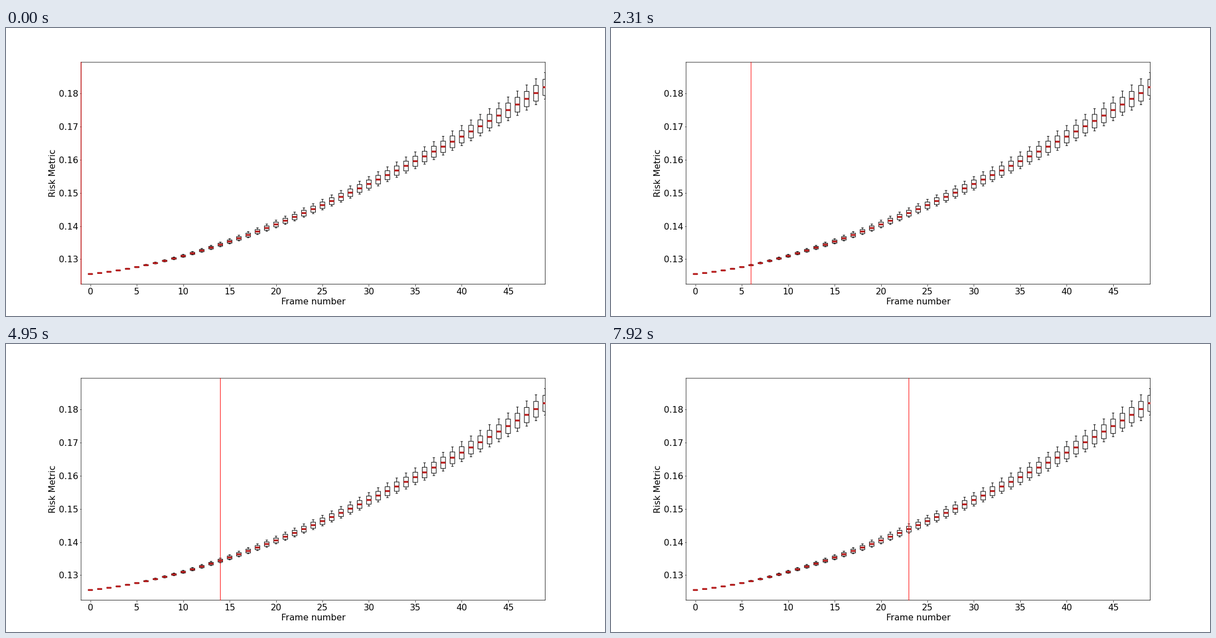
A matplotlib script that plays this animation: 1077x520 px, repeating every 8000 ms.

```python
import numpy as np
import matplotlib.pyplot as plt
from matplotlib.animation import FuncAnimation
from matplotlib.collections import LineCollection

WIDTH, HEIGHT, DPI = 1077, 520, 72
LEFT, RIGHT, TOP, BOTTOM = 135, 969.6, 61.9, 462.6
LOOP_MS, TICK_MS, STEP_MS = 8000, 20, 330
HALF_BOX, HALF_CAP = 0.25, 0.125

plt.rcParams.update({
    "font.family": "DejaVu Sans", "font.size": 15.75, "axes.labelpad": 3,
    "xtick.major.size": 2.5, "ytick.major.size": 2.5,
    "xtick.major.pad": 4.3, "ytick.major.pad": 2.5,
})

# The median is a smooth curve through a few points.
KEY_X = [0, 5, 10, 20, 30, 40, 49]
KEY_Y = [0.12555, 0.12757, 0.1310, 0.14053, 0.15266, 0.16704, 0.18192]
xs = np.arange(50)
median = np.polyval(np.polyfit(KEY_X, KEY_Y, 4), xs)

# Every box grows by the same power law.
growth = (xs / 49) ** 1.38
q1, q3 = median - 0.0025 * growth, median + 0.00237 * growth
low, high = median - 0.0036 * growth, median + 0.00443 * growth


def level(y, half):
    """Horizontal strokes of a given half width, centred on each x."""
    return [[(x - half, v), (x + half, v)] for x, v in zip(xs, y)]


def upright(y0, y1):
    return [[(x, a), (x, b)] for x, a, b in zip(xs, y0, y1)]


def outline(x, lo, hi):
    a, b = x - HALF_BOX, x + HALF_BOX
    return [(a, lo), (b, lo), (b, hi), (a, hi), (a, lo)]


def add_strokes(segments, **style):
    ax.add_collection(LineCollection(segments, snap=False, **style), autolim=False)


fig = plt.figure(figsize=(WIDTH / DPI, HEIGHT / DPI), dpi=DPI)
ax = fig.add_axes([LEFT / WIDTH, 1 - BOTTOM / HEIGHT,
                   (RIGHT - LEFT) / WIDTH, (BOTTOM - TOP) / HEIGHT])
ax.set_xlim(-1, 49)
ax.set_ylim(0.12245, 0.18945)
ax.set_xticks(range(0, 50, 5))
ax.set_yticks(np.arange(0.13, 0.185, 0.01))
ax.yaxis.set_major_formatter("{x:.2f}")
ax.set_xlabel("Frame number")
ax.set_ylabel("Risk Metric")
for spine in ax.spines.values():
    spine.set_snap(False)

add_strokes(
    upright(q3, high) + upright(low, q1)
    + level(high, HALF_CAP) + level(low, HALF_CAP)
    + [outline(*box) for box in zip(xs, q1, q3)],
    colors="black", linewidths=1, zorder=2)
add_strokes(level(median, HALF_BOX), colors="#b91c1c", linewidths=3.3, zorder=4)
cursor = ax.axvline(-1, color="red", linewidth=1, zorder=3, clip_on=False, snap=False)


def update(i):
    step = ((i + 1) * TICK_MS - 1) // STEP_MS
    cursor.set_xdata([step - 1, step - 1])
    return [cursor]


anim = FuncAnimation(fig, update, frames=LOOP_MS // TICK_MS, interval=TICK_MS,
                     repeat=True, repeat_delay=0, blit=False)
plt.show()
```
